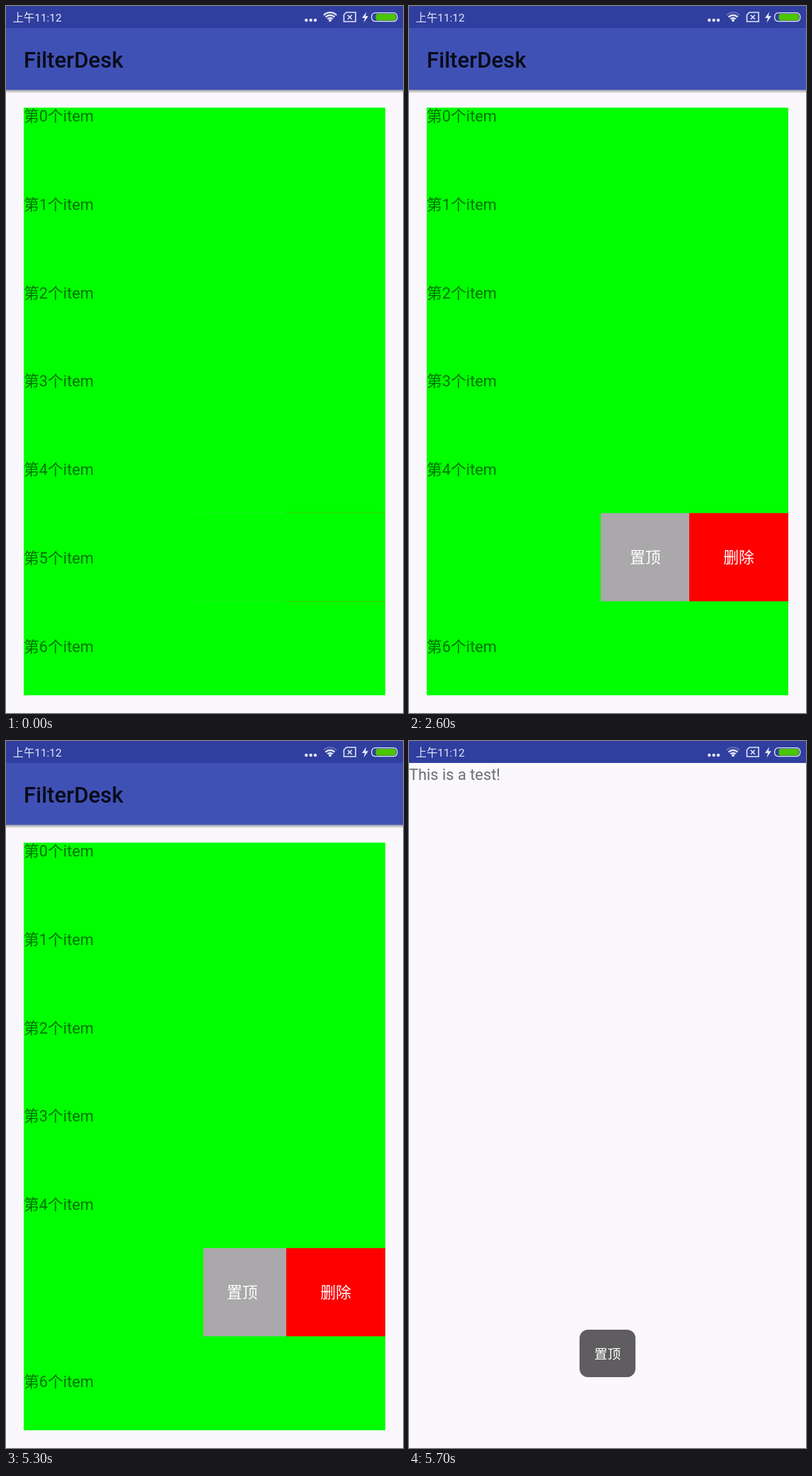
Recreate the animation shown at these times as an HTML page. Size 561 px wide and 998 px high, loop 5800 ms.

```html
<!DOCTYPE html>
<html lang="zh-CN">
<head>
<meta charset="utf-8">
<title>Swipe menu</title>
<style>
  html, body { margin: 0; width: 100%; height: 100%; overflow: hidden; }
  svg { display: block; }
  text { font: 21.8px Roboto, "Noto Sans CJK SC", "Noto Sans CJK", sans-serif; }
  .label { fill: rgba(0, 0, 0, .56); }
  .button { fill: #fff; text-anchor: middle; }
</style>
</head>
<body>
<svg width="100%" height="100%" viewBox="0 0 561 998">
  <defs>
    <linearGradient id="shade" x2="0" y2="1">
      <stop stop-opacity=".34"/>
      <stop offset="1" stop-opacity="0"/>
    </linearGradient>
  </defs>

  <rect width="561" height="998" fill="#faf8fc"/>
  <rect width="561" height="31" fill="#303f9f"/>
  <g id="listPage">
    <rect y="31" width="561" height="87.5" fill="#3f51b5"/>
    <rect y="118.5" width="561" height="5" fill="url(#shade)"/>
    <text x="25" y="87" style="font-size:31.2px;font-weight:500" fill-opacity=".87">FilterDesk</text>
    <rect x="25" y="143.5" width="511" height="829.5" fill="#0f0"/>
    <g id="rows"></g>
    <svg x="25" y="715.6" width="511" height="124.8">
      <rect x="246" width="125" height="125" fill="#aaa8aa"/>
      <rect x="371" width="140" height="125" fill="#f00"/>
      <text class="button" x="308.7" y="70.8">置顶</text>
      <text class="button" x="441" y="70.8">删除</text>
      <g id="item">
        <rect width="511" height="125" fill="#0f0"/>
        <text class="label" y="71">第5个item</text>
      </g>
    </svg>
  </g>
  <rect id="dim" width="561" height="998"/>

  <g id="testPage">
    <rect width="561" height="998" fill="#faf8fc"/>
    <rect width="561" height="31" fill="#303f9f"/>
    <text class="label" y="55">This is a test!</text>
  </g>

  <g id="toast">
    <rect x="241" y="831" width="79" height="67" rx="12" fill="#5f5d60"/>
    <text class="button" x="280.5" y="872" style="font-size:18.7px">置顶</text>
  </g>

  <g fill="#e4e7f6">
    <text x="9.5" y="22" style="font-size:15.4px">上午11:12</text>
    <circle cx="424.3" cy="20" r="2.2"/>
    <circle cx="430.7" cy="20" r="2.2"/>
    <circle cx="437" cy="20" r="2.2"/>
    <circle cx="458" cy="20.3" r="2"/>
    <g id="wifi" fill="none" stroke="#e4e7f6" stroke-width="2.3"></g>
    <path d="M481 9H494V22H477.5V12.5ZM482.8 12.8l6 6m0-6l-6 6" fill="none" stroke="#e4e7f6" stroke-width="1.6"/>
    <path d="M509 8.5L503 17H507L505.5 23.5L512 14.2H508Z"/>
    <rect x="516.7" y="9.7" width="36" height="12" rx="5" fill="none" stroke="#e4e7f6" stroke-width="1.3"/>
    <rect x="522.5" y="11" width="28.5" height="9.5" rx="3" fill="#4cc400"/>
  </g>
</svg>
<script>
const LOOP = 5800, STEP = 100, WIDTH = 561, MENU = 265;
const $ = id => document.getElementById(id);
const progress = (t, start, end) => Math.min(1, Math.max(0, (t - start) / (end - start)));
const smooth = u => u * u * (3 - 2 * u);
const easeOut = (u, power) => 1 - (1 - u) ** power;
const shift = (id, x, y = 0) => $(id).setAttribute('transform', `translate(${x} ${y})`);

$('rows').innerHTML = [0, 1, 2, 3, 4, 6].map(i =>
  `<text class="label" x="25" y="${163 + 124.75 * i}">第${i}个item</text>`).join('');

$('wifi').innerHTML = [5.2, 9, 12.8].map(r => {
  const d = r * Math.SQRT1_2;
  return `<path d="M${458 - d} ${22 - d}a${r} ${r} 0 0 1 ${2 * d} 0"/>`;
}).join('');

function openness(t) {
  if (t < 3100) return smooth(progress(t, 1950, 2550));
  if (t < 4100) return 1 - smooth(progress(t, 3100, 3500));
  if (t < 5200) return easeOut(progress(t, 4102, 4600), 2);
  return 1 - smooth(progress(t, 5254, 5704));
}

function draw(now) {
  const t = Math.floor(now % LOOP / STEP) * STEP;
  const slide = easeOut(progress(t, 5300, 5700), 2.084);
  shift('item', -MENU * openness(t));
  shift('listPage', -124 * slide);
  $('dim').setAttribute('opacity', .665 * slide);
  shift('testPage', WIDTH * (1 - slide));
  shift('toast', 0, 22.8 * (1 - slide));
  $('toast').setAttribute('opacity', Math.min(1, 1.44 * slide));
  $('wifi').lastChild.setAttribute('opacity', t < 1700 ? 1 : .25);
}

const start = performance.now();
function tick() {
  draw(performance.now() - start);
  requestAnimationFrame(tick);
}
tick();
</script>
</body>
</html>
```
